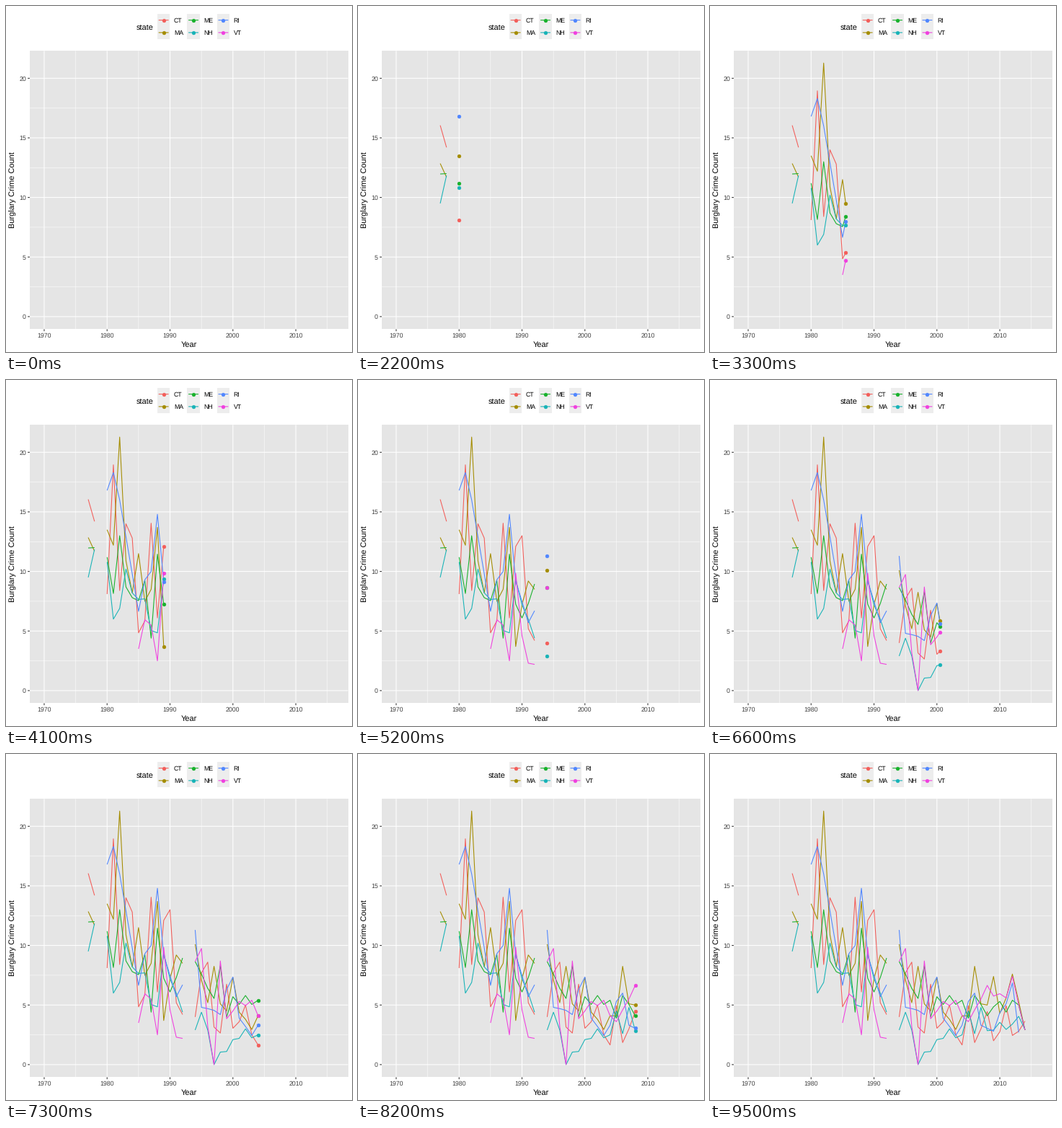
A matplotlib script that plays this animation: 480 px wide and 480 px high, repeating every 10000 ms.

```python
import numpy as np
import matplotlib.pyplot as plt
from matplotlib.animation import FuncAnimation
from matplotlib.patches import Rectangle

SIZE, DPI = 480, 80
PX = 72 / DPI                      # one pixel in points
FRAMES, FIRST, LAST = 100, 1970, 2016
LEFT, RIGHT, TOP, BOTTOM = 32.9, 474.5, 62.3, 448.4

plt.rcParams.update({
    "font.family": "Liberation Sans",
    "text.hinting": "none",
    "lines.solid_capstyle": "butt",
})

fig = plt.figure(figsize=(SIZE / DPI, SIZE / DPI), dpi=DPI, facecolor="white")
ax = fig.add_axes([0, 0, 1, 1])
ax.set(xlim=(0, SIZE), ylim=(SIZE, 0))
ax.axis("off")


def px(year):
    return 52.97 + 8.727 * (np.asarray(year) - FIRST)


def py(count):
    return 430.9 - 16.53 * np.asarray(count)


def box(x0, y0, x1, y1, color):
    ax.add_patch(Rectangle((x0, y0), x1 - x0, y1 - y0, fc=color, lw=0, zorder=0))


def stroke(xs, ys, color, width=1.07, z=1):
    return ax.plot(xs, ys, color=color, lw=width * PX, zorder=z, snap=False)[0]


def dot(xs, ys, color, z=5):
    return ax.plot(xs, ys, "o", color=color, ms=4.6 * PX, mew=0.7 * PX,
                   zorder=z, snap=False)[0]


def label(x, y, text, size=8.8, color="black", **kw):
    ax.text(x, y, text, fontsize=size * PX, color=color, va="baseline",
            rotation_mode="anchor", **kw)


def draw_panel():
    box(LEFT, TOP, RIGHT, BOTTOM, "#e5e5e5")
    for year in range(1975, 2016, 10):
        stroke([px(year)] * 2, [TOP, BOTTOM], "white", 0.53)
    for count in np.arange(2.5, 20, 5):
        stroke([LEFT, RIGHT], [py(count)] * 2, "white", 0.53)
    for year in range(1970, 2011, 10):
        x = px(year)
        stroke([x, x], [TOP, BOTTOM], "white")
        stroke([x, x], [BOTTOM, BOTTOM + 2.75], "#333333")
        label(x, 460, str(year), color="#404040", ha="center")
    for count in range(0, 21, 5):
        y = py(count)
        stroke([LEFT, RIGHT], [y, y], "white")
        stroke([LEFT - 2.75, LEFT], [y, y], "#333333")
        label(28, y + 3.2, str(count), color="#404040", ha="right")
    label(253.7, 473, "Year", 11, ha="center")
    label(13.2, 255.5, "Burglary Crime Count", 11, ha="center", rotation=90)
    label(180.5, 33, "state", 11)


class Series:
    """One state's line: runs of consecutive years, revealed over time."""

    def __init__(self, color, *runs):
        self.runs = []
        for start, counts in runs:
            years = start + np.arange(len(counts))
            keys = np.round((years - FIRST) * (FRAMES - 1) / (LAST - FIRST))
            self.runs.append((keys, px(years), py(counts)))
        self.color = color
        self.line = stroke([], [], color, z=3)
        self.head = dot([], [], color)

    def show(self, frame):
        xs, ys, head = [], [], ([], [])
        for keys, rx, ry in self.runs:
            if frame < keys[0]:
                break
            seen = keys <= frame
            x, y = np.interp(frame, keys, rx), np.interp(frame, keys, ry)
            xs += [*rx[seen], x, np.nan]
            ys += [*ry[seen], y, np.nan]
            if frame < keys[-1]:
                head = [x], [y]
        self.line.set_data(xs, ys)
        self.head.set_data(*head)


draw_panel()

ct = Series(
    "#f35e5a",
    (1977, [16.05, 14.2]),
    (1980, [8.1, 18.95, 8.4, 14, 12.8, 4.85, 5.85, 14.05, 6.1, 12.1, 13, 5.2, 4.2]),
    (1994, [4, 7.7, 8.6, 3.15, 2.65, 6.75, 3.05, 3.6, 5, 2.5, 1.65,
            4.95, 1.85, 3, 4.45, 2, 2.75, 4.95, 2.45, 2.8, 3.65]))
ma = Series(
    "#a48c00",
    (1977, [12.85, 11.7]),
    (1980, [13.5, 12.2, 21.28, 10.9, 8.2, 11.5, 7.5, 8.5, 13.7, 3.7, 7.2, 9.2, 8.5]),
    (1994, [10.1, 7.1, 5.2, 8.25, 5.1, 4.5, 7.3, 4.4, 3.8, 2.95, 4.1,
            4.1, 8.25, 5.1, 5, 7.4, 4.3, 5.6, 7.6, 5.3, 2.9]))
me = Series(
    "#17b12b",
    (1977, [11.97, 12]),
    (1980, [11.2, 8.15, 13, 8.7, 7.8, 7.55, 9.25, 4.4, 11.45, 7.25, 6.1, 7.3, 8.95]),
    (1994, [8.65, 7.6, 6.4, 5.55, 8.3, 4, 5.7, 5.05, 5.8, 5.05, 5.4,
            3.9, 5.8, 5.05, 4.1, 4.85, 5.3, 4.4, 5.4, 5, 2.9]))
nh = Series(
    "#17b3b7",
    (1977, [9.5, 11.85]),
    (1980, [10.8, 6, 6.9, 10.2, 8.2, 7.65, 7.7, 5.05, 4.85, 9.35, 7.2, 6, 4.4]),
    (1994, [2.9, 4.4, 2.9, 0, 1.05, 1.1, 2.1, 2.2, 3, 2.25, 2.5,
            4.5, 2.6, 4.8, 2.85, 2.9, 3.55, 2.95, 3.4, 4.05, 2.95]))
ri = Series(
    "#5086ff",
    (1980, [16.8, 18.3, 16, 12.9, 9.8, 6.65, 9.3, 10, 14.8, 9.15, 7.5, 5.7, 6.7]),
    (1994, [11.3, 4.8, 4.7, 4.55, 4.2, 6.3, 7.35, 3.9, 3.2, 2.45, 3.3,
            5.3, 6, 3.3, 3.05, 2.8, 4.35, 5.1, 6.85, 2.7]))
vt = Series(
    "#f040df",
    (1985, [3.5, 5.95, 5.5, 2.5, 9.85, 4.6, 2.3, 2.2]),
    (1994, [8.65, 9.75, 3.2, 0, 8.7, 3.85, 4.5, 5.3, 4.95, 5.4, 4.1,
            3.6, 4.6, 5.5, 6.65, 5.75, 5.95, 5.6, 7.4, 5, 2.9]))

states = {"CT": ct, "MA": ma, "ME": me, "NH": nh, "RI": ri, "VT": vt}

for i, (name, series) in enumerate(states.items()):
    col, row = divmod(i, 2)
    x, y = 210 + 41.4 * col, 19.6 + 17.28 * row
    box(x, y - 8.64, x + 17.28, y + 8.64, "#ededed")
    stroke([x + 1.73, x + 15.55], [y, y], series.color, z=3)
    dot([x + 8.64], [y], series.color)
    label(x + 22.8, y + 3.2, name)


def update(frame):
    for series in states.values():
        series.show(frame)
    return []


anim = FuncAnimation(fig, update, frames=FRAMES, interval=100,
                     repeat=True, repeat_delay=0, blit=False)
plt.show()
```
